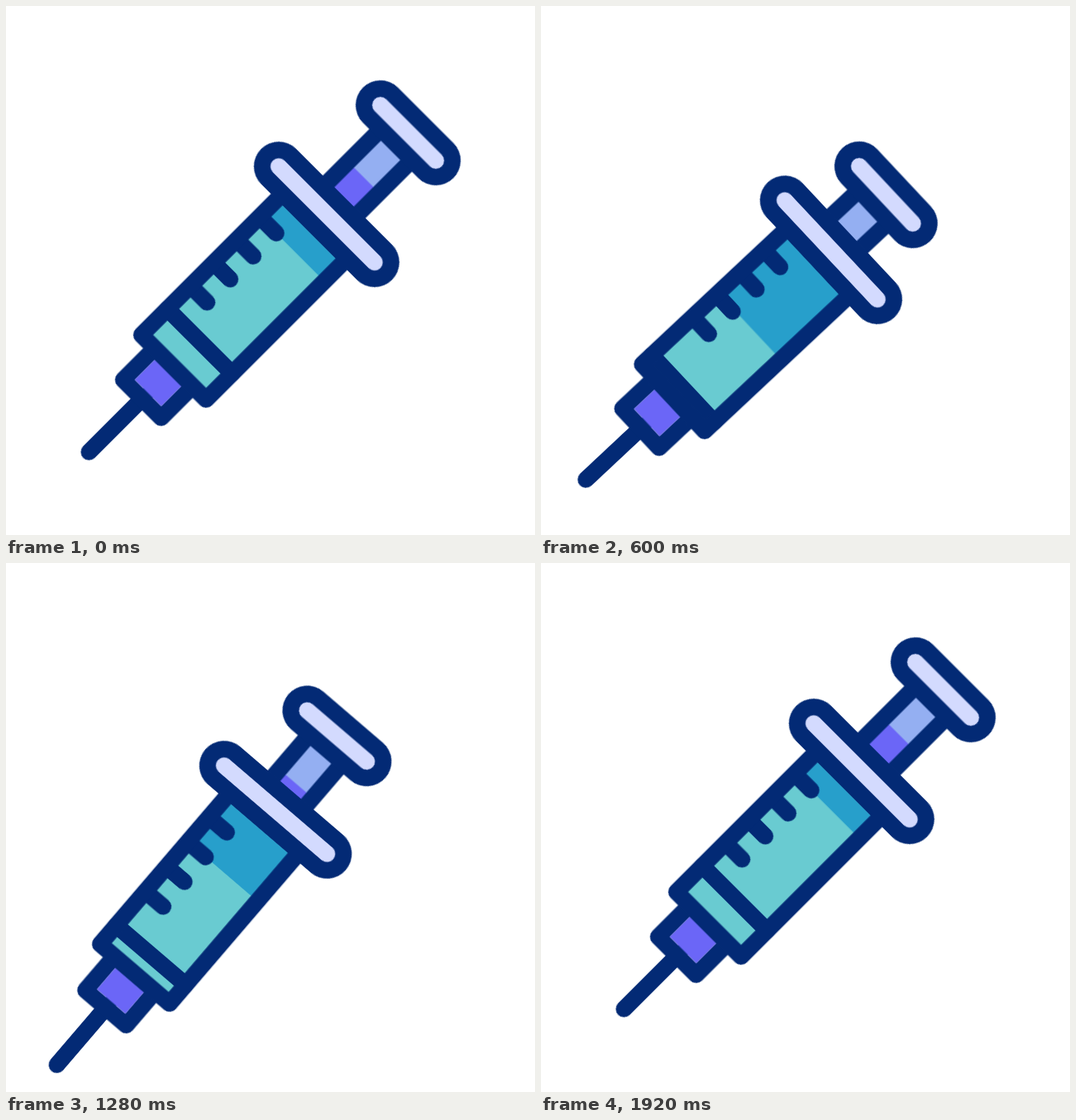
An HTML page that plays this animation: 640x640 px, repeating every 2.2 s.

```html
<!DOCTYPE html>
<html lang="en">
<head>
<meta charset="utf-8">
<title>Syringe</title>
<style>
  html, body { margin: 0; height: 100%; overflow: hidden; background: #fff; }
  svg { display: block; width: 100vw; height: 100vh; }

  .navy { fill: #032a75; }
  .teal { fill: #69cbd1; }
  .blue { fill: #279fcb; }
  .sky { fill: #94aff2; }
  .violet { fill: #6b66f7; }
  .line { fill: none; stroke: #032a75; stroke-width: 20; stroke-linecap: round; stroke-linejoin: round; }
  .thick { stroke-width: 60; }
  .shine { stroke: #d3dafe; }
  .spark { stroke: #ffcb4f; stroke-dasharray: 1 3; }

  .move, .tilt, .plunger, .liquid, .seal, .spark {
    animation: 2200ms cubic-bezier(.333, 0, .667, 1) infinite both;
  }
  .move { animation-name: move; }
  .tilt { animation-name: tilt; }
  .plunger { animation-name: plunger; }
  .liquid { animation-name: liquid; transform-origin: 0 -66.5px; }
  .seal { animation-name: seal; }
  .spark { animation-name: draw, show; animation-timing-function: ease-in-out, step-end; }

  /* Stab towards the lower left, settle, then pull back. */
  @keyframes move {
    0%, 17.27% { transform: translate(290.3px, 349.7px); }
    34.55% { transform: translate(225.8px, 413.6px); }
    41.82%, 54.55% { transform: translate(228.3px, 411.2px); }
    70.91%, 100% { transform: translate(290.3px, 349.7px); }
  }
  @keyframes tilt {
    0%, 9.09% { transform: rotate(45deg); }
    16.82% { transform: rotate(39.9deg); }
    27.73% { transform: rotate(46.9deg); }
    34.55% { transform: rotate(43.3deg); }
    41.82%, 50.91% { transform: rotate(45deg); }
    60.45% { transform: rotate(39.9deg); }
    71.36% { transform: rotate(46.9deg); }
    86.36%, 100% { transform: rotate(45deg); }
  }
  @keyframes plunger {
    0%, 17.27%, 67.73%, 100% { transform: none; }
    26.59%, 49.09% { transform: translate(-3.2px, 45.5px); }
  }
  @keyframes liquid {
    0%, 17.27%, 67.73%, 100% { transform: scaleY(1); }
    26.59%, 49.09% { transform: scaleY(3.56); }
  }
  @keyframes seal {
    0%, 17.27%, 67.73%, 100% { transform: none; }
    26.59%, 49.09% { transform: translateY(28.5px); }
  }
  @keyframes draw {
    0%, 41.82% { stroke-dashoffset: 1; }
    47.27%, 50.91% { stroke-dashoffset: 0; }
    56.36%, 100% { stroke-dashoffset: -1; }
  }
  @keyframes show {
    0%, 56.36%, 100% { opacity: 0; }
    41.82% { opacity: 1; }
  }
</style>
</head>
<body>
<svg viewBox="0 0 640 640">
  <path class="line spark" pathLength="1" d="M15.6 563L22.4 535"/>
  <g class="move"><g class="tilt"><g transform="translate(0 -42)">
    <path class="line" d="M0 215V310.4"/>
    <rect class="line" x="-32.5" y="165" width="65" height="54.5"/>
    <rect class="violet" x="-22.6" y="175" width="45.2" height="34.5"/>

    <g class="plunger">
      <rect class="navy" x="-36.5" y="-235" width="73" height="127"/>
      <rect class="sky" x="-16.5" y="-206" width="33" height="47"/>
      <rect class="violet" x="-16.5" y="-159.5" width="33" height="50"/>
      <path class="line thick" d="M-47.4-235.5H47.4"/>
      <path class="line shine" d="M-47.4-235.5H47.4"/>
    </g>

    <rect class="teal" x="-55.3" y="-70" width="110.6" height="235.5"/>
    <rect class="blue liquid" x="-55.3" y="-66.5" width="110.6" height="29.7"/>
    <path class="line seal" d="M-55 121H55"/>
    <path class="line" d="M-55-36.8h28M-55 2.6h28M-55 42h28M-55 81.4h28"/>
    <rect class="line" x="-55.3" y="-80" width="110.6" height="245.5"/>

    <path class="line thick" d="M-82-96H82"/>
    <path class="line shine" d="M-82-96H82"/>
  </g></g></g>
</svg>
</body>
</html>
```
